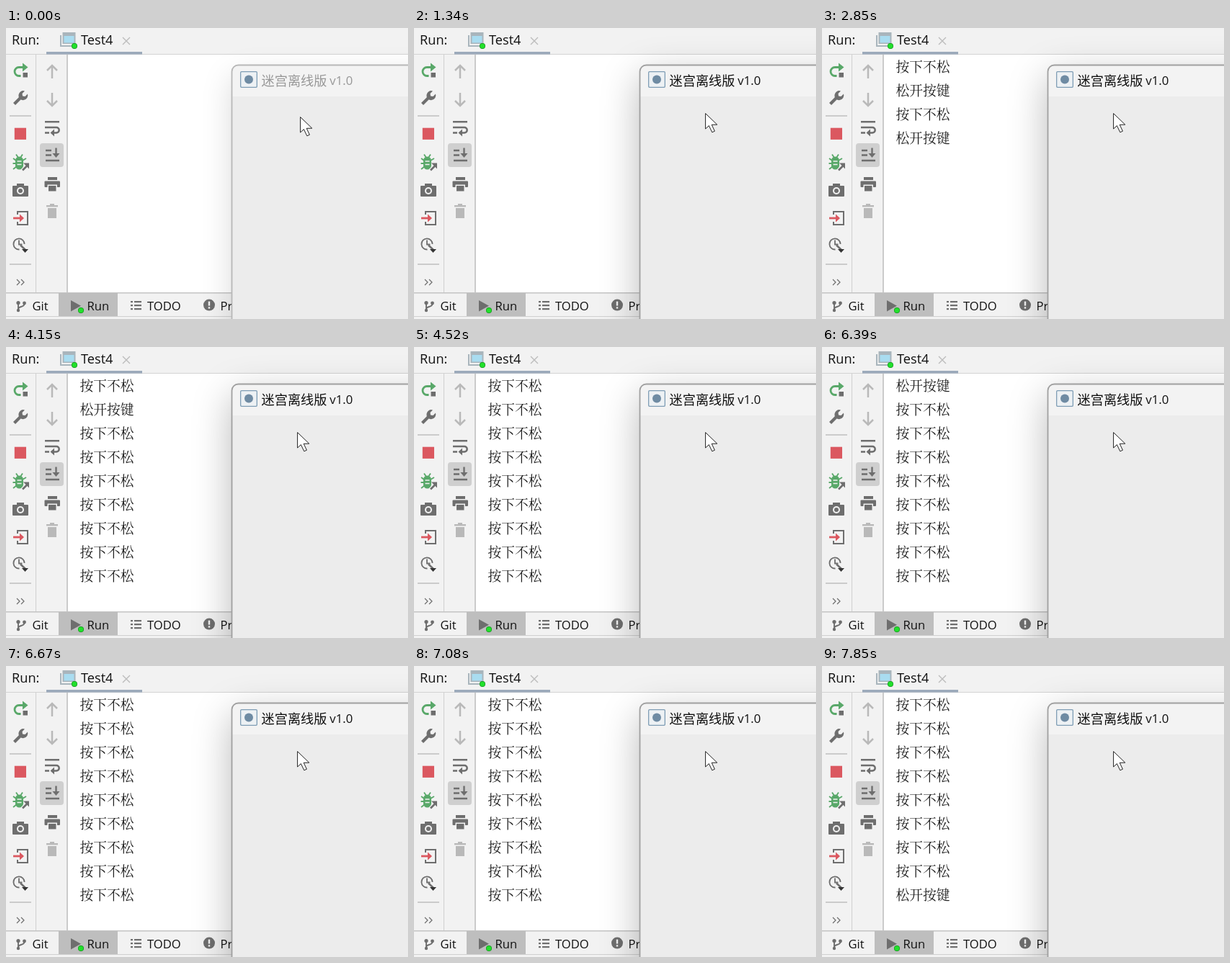
Recreate the animation shown at these times as an HTML page with a canvas. Size 558x404 px, loop 8010 ms.

```html
<!DOCTYPE html>
<html lang="zh-CN">
<head>
<meta charset="utf-8">
<title>Console</title>
<style>
  html, body { margin: 0; width: 100%; height: 100%; overflow: hidden; background: #f2f2f2; }
  canvas, svg { position: absolute; left: 0; top: 0; width: 558px; height: 404px; }
  text { font-family: "Open Sans", "Noto Sans", "Noto Sans CJK SC", "Noto Sans CJK", sans-serif; fill: #111; }
  .head { font-size: 18.2px; }
  .foot { font-size: 16.6px; }
  .title { font-size: 18.2px; }
  .title tspan { font-size: 16.8px; }
  .log text { font: 300 18.8px "Noto Serif CJK SC", "Noto Sans CJK SC", "Noto Sans CJK", serif; fill: #1c1c1c; }
</style>
</head>
<body>
<canvas width="558" height="404"></canvas>
<svg viewBox="0 0 558 404">
  <clipPath id="left"><rect width="313" height="404"/></clipPath>
  <g class="head">
    <text x="8" y="23">Run:</text>
    <text x="104" y="23">Test4</text>
  </g>
  <g class="foot" clip-path="url(#left)">
    <text x="36.5" y="392.4">Git</text>
    <text x="112.5" y="392.4">Run</text>
    <text x="196" y="392.4">TODO</text>
    <text x="297.5" y="392.4">Problems</text>
  </g>
  <g class="log"></g>
  <text class="title" x="354.5" y="79.5">迷宫离线版<tspan x="449.3" y="79">v1.0</tspan></text>
  <path id="cursor" fill="#fff" stroke="#222" stroke-width="1" stroke-linejoin="round"
    d="M.6 .6V22L5.4 17.6L9.8 26.8L13.4 25.2L9.2 16.3L16.8 16.2Z"/>
</svg>
<script>
const LOOP = 8010, ROWS = 9;
const PRESS = '按下不松', RELEASE = '松开按键';
const GRAY = '#6e6e6e', PALE = '#b9b9b9', GREEN = '#59a869', RED = '#db5860', PANEL = '#f2f2f2';
const ctx = document.querySelector('canvas').getContext('2d');
const title = document.querySelector('.title');
const cursor = document.querySelector('#cursor');
const log = document.querySelector('.log');

const rows = Array.from({ length: ROWS }, (_, i) => {
  const el = document.createElementNS('http://www.w3.org/2000/svg', 'text');
  el.setAttribute('x', 102.5);
  el.setAttribute('y', 61.4 + i * 33);
  return log.appendChild(el);
});

// Console output: [time, text]; a held key repeats every 33 ms.
const events = [];
const emit = (at, text) => events.push([at, text]);
const hold = (from, to) => { for (let at = from; at < to; at += 33) emit(at, PRESS); };
emit(1990, PRESS); emit(2080, RELEASE);
emit(2720, PRESS); emit(2810, RELEASE);
emit(3500, PRESS); hold(3984, 4151); hold(4230, 4880); emit(4900, RELEASE);
emit(5690, PRESS); hold(6180, 7100); emit(7130, RELEASE);

function rect(x, y, w, h, color) {
  ctx.fillStyle = color;
  ctx.fillRect(x, y, w, h);
}
function fill(d, color) {
  ctx.fillStyle = color;
  ctx.fill(new Path2D(d));
}
function line(d, color, width = 2) {
  ctx.strokeStyle = color;
  ctx.lineWidth = width;
  ctx.stroke(new Path2D(d));
}
function disc(x, y, r, color) {
  ctx.fillStyle = color;
  ctx.beginPath();
  ctx.arc(x, y, r, 0, 7);
  ctx.fill();
}
function box(x, y, w, h, r, color) {
  ctx.fillStyle = color;
  ctx.beginPath();
  ctx.roundRect(x, y, w, h, r);
  ctx.fill();
}
function liveDot(x, y) {
  disc(x, y, 4, '#12941c');
  disc(x, y, 3.3, '#22e02c');
}

function panels() {
  rect(0, 0, 558, 404, PANEL);
  rect(86, 37, 472, 330, '#fff');
  rect(0, 36, 558, 1, '#d3d3d3');
  rect(56, 33, 133, 3.6, '#9caabb');
  rect(41, 37, 1, 330, '#d0d0d0');
  rect(84, 37, 2, 330, '#cbcbcb');
  rect(0, 367, 558, 1.5, '#c4c4c4');
  rect(73, 368, 82, 32, '#bebebe');
  rect(0, 400, 558, 1, '#cfcfcf');
  rect(5, 121, 30, 2, '#cbcbcb');
  rect(5, 327, 30, 2, '#cbcbcb');
}

function tabIcons() {
  line('M76 10V25H92', '#a9b5bc', 2);
  rect(78.5, 6, 18, 16, '#a9b5bc');
  rect(80.5, 11, 14, 9.5, '#a9dcf0');
  liveDot(95, 25);
  line('M162 13L172 23M172 13L162 23', '#bcbcbc', 1.4);
}

function runIcons() {
  // rerun
  line('M24 54.5H18A6 6 0 0 0 18 66.5H20.5', GREEN, 2.8);
  fill('M23 48.5L30.5 54.5L23 60.5Z', GREEN);
  rect(23.5, 62, 6.5, 6.5, GRAY);
  // wrench
  line('M11.5 105.5L21.5 95.5', GRAY, 4.2);
  fill('M26 87.5L22.5 91L23 94.5L26.5 95L30 91.5A6.5 6.5 0 1 1 26 87.5Z', GRAY);
  // stop
  rect(11.8, 138.7, 16.2, 16.2, RED);
  // debug
  line('M10 181L14 184M9.5 188H14M10 196L15 192M28 181L23 184M14 175.5L17 180M23 175.5L20 180', GREEN, 1.8);
  box(13, 178.5, 11, 18, 5.5, GREEN);
  line('M15.5 185H21.5M15.5 189.5H21.5', PANEL, 1.4);
  line('M22.5 198L31 189.5', PANEL, 5);
  line('M23 197.5L30 190.5', GRAY, 2.6);
  fill('M24 187.5H32V195.5Z', GRAY);
  // camera
  box(9, 219, 22, 15, 1, GRAY);
  rect(15, 216, 10, 4, GRAY);
  disc(20, 226, 5, PANEL);
  disc(20, 226, 3, GRAY);
  // exit
  line('M16 259V255H30V273H16V269', GRAY, 2);
  line('M10 264H21', RED, 2.8);
  fill('M19 258.5L25 264L19 269.5Z', RED);
  // clock
  line('M18.5 307.5A7.6 7.6 0 1 1 25.6 300', GRAY, 1.8);
  line('M18 294.5V300.5H22.5', GRAY, 1.8);
  line('M20 301.5L27 308', GRAY, 2.4);
  fill('M22 307H31L26.5 312Z', '#333');
  // more
  line('M15 349L19 353L15 357M21 349L25 353L21 357', GRAY, 1.2);
}

function consoleIcons() {
  line('M64 70V53M57 59L64 52L71 59', PALE, 2.5);
  line('M64 90V107M57 101L64 108L71 101', PALE, 2.5);
  // soft wrap
  line('M54 130.2H74M54 138H70A3.7 3.7 0 0 1 70 145.4H66M54 145.4H60', GRAY, 2.5);
  fill('M67 140.4V150.4L61.5 145.4Z', GRAY);
  // scroll to end
  box(47, 160, 33, 33, 4, '#cfcfcf');
  line('M55 170H63M55 176.5H63M55 184H74', GRAY, 2.4);
  line('M69.5 166.5V176', GRAY, 2.4);
  fill('M64.5 174H74.5L69.5 180Z', GRAY);
  // printer
  rect(58, 207, 13, 4, GRAY);
  box(53.5, 212.5, 21.5, 8.5, 1, GRAY);
  rect(57.5, 217.5, 13.5, 9, PANEL);
  rect(59, 219, 10.5, 7.5, GRAY);
  // trash
  rect(56, 246, 16, 2.4, PALE);
  rect(61, 244, 6, 3, PALE);
  rect(58, 250, 12, 14, PALE);
}

function footIcons() {
  line('M17 383V393M25.5 383C25.5 388 17 386 17 390', GRAY, 1.9);
  disc(17, 381.5, 2.6, GRAY);
  disc(25.5, 382, 2.4, GRAY);
  disc(17, 392, 2.2, GRAY);
  fill('M90 378L104 385.7L90 393.5Z', GRAY);
  liveDot(104, 392);
  for (const y of [379, 384, 389]) {
    rect(173, y, 3, 2.2, GRAY);
    rect(178, y, 10, 2.2, GRAY);
  }
  disc(282, 384.6, 8, GRAY);
  rect(280.8, 379.6, 2.4, 6, PANEL);
  rect(280.8, 387.2, 2.4, 2.4, PANEL);
}

function appWindow(focus) {
  const shape = new Path2D();
  shape.roundRect(313.5, 51.5, 700, 700, 9);
  ctx.save();
  ctx.shadowColor = `rgba(0,0,0,${0.15 + 0.13 * focus})`;
  ctx.shadowBlur = 44 + 10 * focus;
  ctx.shadowOffsetY = 16;
  ctx.fillStyle = '#ececec';
  ctx.fill(shape);
  ctx.restore();
  ctx.save();
  ctx.clip(shape);
  rect(313, 51, 245, 44, '#f3f3f3');
  ctx.restore();
  const edge = 184 - 24 * focus;
  ctx.strokeStyle = `rgb(${edge},${edge},${edge})`;
  ctx.lineWidth = 1.8;
  ctx.stroke(shape);
  box(325, 60, 24, 23, 2, '#7f9db5');
  box(326.3, 61.3, 21.4, 20.4, 1, '#edf1f4');
  disc(337, 71.5, 6, '#6f8ba3');
}

function draw(t) {
  const focus = t < 370 ? 0 : Math.min(1, (Math.floor((t - 370) / 40) + 1) / 3);
  panels();
  tabIcons();
  runIcons();
  consoleIcons();
  footIcons();
  appWindow(focus);

  const ink = Math.round(152 - 136 * focus);
  title.style.fill = `rgb(${ink},${ink},${ink})`;
  const [cx, cy] = t < 40 ? [408, 123] : t < 80 ? [406, 121] : t < 1060 ? [404, 120] : [404, 118];
  cursor.setAttribute('transform', `translate(${cx} ${cy})`);

  const shown = events.filter(([at]) => at <= t).slice(-ROWS);
  rows.forEach((el, i) => {
    const text = shown[i] ? shown[i][1] : '';
    if (el.textContent !== text) el.textContent = text;
  });
}

const start = performance.now();
function tick() {
  draw((performance.now() - start) % LOOP);
  requestAnimationFrame(tick);
}
tick();
</script>
</body>
</html>
```
